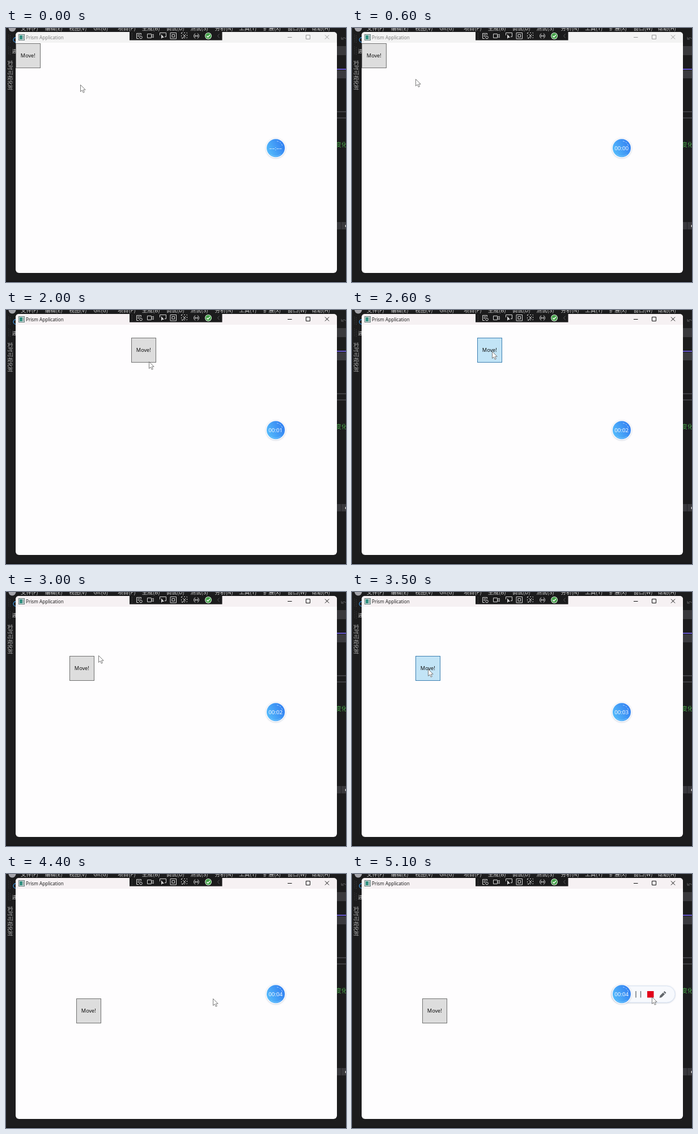
An HTML page for the animation above (5300 ms loop, 600 by 449 pixels).

```html
<!DOCTYPE html>
<html lang="en">
<head>
<meta charset="utf-8">
<title>Move button</title>
<style>
  html, body { margin: 0; width: 100%; height: 100%; overflow: hidden; background: #1c1c1d; }
  svg { display: block; width: 600px; height: 449px; }
  text { font-family: "Open Sans", "Noto Sans", sans-serif; white-space: pre; }
  .cjk { font-family: "Noto Sans CJK SC", "Noto Sans CJK", "Open Sans", sans-serif; }
  .line { fill: none; stroke: #d6d6d6; }
  #title { fill: #777; }
  #chrome { fill: none; stroke: #999; }
  #bar { fill: #f3f3f3; }
  .active #title { fill: #111; }
  .active #chrome { stroke: #111; }
  .active #bar { fill: #f6f1f3; }
  #box rect { fill: #ddd; stroke: #707070; }
  #box.hover rect { fill: #c2e4f6; stroke: #3c7fb1; }
  #box.down rect { fill: #bfe3f6; stroke: #2c628b; }
</style>
</head>
<body>
<svg viewBox="0 0 600 449">
  <defs>
    <linearGradient id="blue" x1="1" y1="0.2" x2="0" y2="0.7">
      <stop offset="0" stop-color="#307cf1"/>
      <stop offset="1" stop-color="#55bcfb"/>
    </linearGradient>
    <filter id="soft" x="-30%" y="-30%" width="160%" height="160%">
      <feDropShadow dx="0" dy="0.5" stdDeviation="1.2" flood-color="#7a8ca8" flood-opacity="0.5"/>
    </filter>
    <clipPath id="client"><rect x="17" y="26" width="567" height="407"/></clipPath>
  </defs>

  <!-- editor behind the window -->
  <rect width="600" height="449" fill="#1c1c1d"/>
  <rect y="447.5" width="600" height="1.5" fill="#111112"/>
  <circle cx="11" cy="0" r="6.5" fill="#a4a4aa"/>
  <g id="menu" font-size="9.5" fill="#d0d0d0"></g>
  <path d="M4.5 12V27M7.5 13V27M4.5 33V47M7.5 34V47" stroke="#46464a" stroke-dasharray="1 2"/>
  <circle cx="17" cy="21" r="4" fill="none" stroke="#3c8fd6" stroke-width="1.3"/>
  <text class="cjk" x="10.5" y="43.5" font-size="8" fill="#d0d0d0">进</text>
  <text class="cjk" transform="translate(3.5 57) rotate(90)" font-size="8.8" fill="#b4b4b4">实时可视化树</text>
  <path d="M592 20q4-5 8-1M592 16v4h4" fill="none" stroke="#5a5a5d"/>
  <rect x="583" y="32" width="17" height="16" fill="#39393c"/>
  <rect x="583" y="72" width="17" height="1.7" fill="#7160e8"/>
  <rect x="583" y="75" width="17" height="14" fill="#3a3a3e"/>
  <path d="M583 148H600M583 159H600" stroke="#4a4a4e" stroke-width="1.6"/>
  <text class="cjk" x="582" y="210" font-size="10" fill="#48a548">变化</text>
  <rect x="583" y="343" width="17" height="13" fill="#38383b"/>
  <path d="M591.5 343V356" stroke="#232325"/>
  <circle cx="601" cy="350" r="2.5" fill="#ddd"/>

  <!-- application window -->
  <g id="window">
    <rect x="17" y="7" width="567" height="426" rx="6" fill="#fefdfe"/>
    <path id="bar" d="M17 26V13q0-6 6-6H578q6 0 6 6V26Z"/>
    <g transform="translate(22 11)">
      <rect x=".5" y=".5" width="10" height="10" fill="#dfe9e8" stroke="#5d7775"/>
      <rect x="2" y="2" width="5" height="7" fill="#2f8f7f"/>
      <path d="M8.500 2V9" stroke="#5d7775"/>
    </g>
    <text id="title" x="35" y="20" font-size="8.200">Prism Application</text>
    <path id="chrome" d="M497 16.500h7.500M529.500 12.500h7v7h-7zM563 12.500l7 7M570 12.500l-7 7"/>
  </g>

  <!-- debug toolbar -->
  <rect x="218" y="7" width="163.500" height="14.600" fill="#1b1b1c"/>
  <path d="M222.500 9V20" stroke="#555" stroke-dasharray="1 2"/>
  <g class="line">
    <path d="M238.500 12V9.500H230.500V18.500H234M232 12h5M232 14.500h3"/>
    <circle cx="238" cy="16.500" r="2.300"/>
    <path d="M249.500 10.500h7v7h-7zM257 13l3-2v6l-3-2"/>
    <path d="M271.500 13V8.500H282.500V15.500H280"/>
    <path d="M274 11v8l2-2h3z" fill="#d6d6d6" stroke="none"/>
    <path d="M290 8.500h10.500v10.500H290zM293 11.500h4.500v4.500H293z"/>
    <path d="M309.500 8.500h10v9h-10z" stroke-dasharray="2 2.500"/>
    <path d="M311 19l6-8M312 11l5 5"/>
    <path d="M334 9.500q-5 4.500 0 9M338 9.500q5 4.500 0 9M334 12v4M338 12v4M334 14h4"/>
  </g>
  <circle cx="357" cy="14" r="6" fill="#dceedd"/>
  <circle cx="357" cy="14" r="5" fill="#43a047"/>
  <path d="M354.300 14l2 2.200 3.600-4.200" fill="none" stroke="#fff" stroke-width="1.400"/>
  <path d="M376.500 10.500l-3 3.500 3 3.500" fill="none" stroke="#5a5a5d"/>

  <g clip-path="url(#client)">
    <g id="box">
      <rect x=".5" y=".5" width="43" height="43"/>
      <text x="21.800" y="24.800" font-size="9.200" font-weight="500" text-anchor="middle">Move!</text>
    </g>
  </g>

  <!-- recorder -->
  <rect id="panel" x="458" y="198" height="29" rx="14.500" fill="#f7f9fd" stroke="#dbe5f4" filter="url(#soft)"/>
  <g id="tools">
    <path d="M501 207V218.500M509.500 207V218.500" stroke="#737980" stroke-width="1.500"/>
    <rect x="521" y="207" width="11.500" height="11.500" fill="#e2001a"/>
    <path d="M542.500 219l1-4 5.500-5.500 3 3-5.500 5.500zM549.800 208.700l1.700-1.700 3 3-1.700 1.700z" fill="#62676c"/>
  </g>
  <circle cx="476" cy="212.300" r="17.500" fill="#f6f9fe" filter="url(#soft)"/>
  <circle cx="476" cy="212.300" r="16" fill="url(#blue)"/>
  <path d="M478 200q7 1 9.500 8" fill="none" stroke="#cfe6ff" stroke-dasharray="3 2" opacity=".75"/>
  <path d="M467 223.500q9 6 18 0" fill="none" stroke="#8fd6ff" opacity=".6"/>
  <text id="clock" x="475.700" y="215.900" font-size="9.800" fill="#fff" text-anchor="middle"></text>

  <path id="cursor" d="M.5 .5V12.500L3.300 9.900L5.300 14.300L7.300 13.400L5.400 9.200H9.200Z" fill="#fff" stroke="#5a5a5a" stroke-width=".8"/>
</svg>
<script>
const $ = id => document.getElementById(id);
const LOOP = 5300, STEP = 100;
const clamp = u => Math.min(1, Math.max(0, u));

// A stroke runs straight to its end point; bend bows it, wave swings it from side to side.
const move = (start, end, to, bend = [0, 0], wave = 0) => ({ start, end, to, bend, wave });

const boxPath = { from: [17, 27], moves: [
  move(1200, 2000, [221, 49], [0, 130], 115),
  move(2600, 3000, [112, 113], [-115, 0]),
  move(3600, 4200, [124, 220], [-50, -48])
] };
const cursorPath = { from: [131, 100], moves: [
  move(500, 1000, [35, 51]),
  move(1200, 2000, [252, 91], [0, 130], 115),
  move(2000, 2300, [247, 73]),
  move(2600, 3000, [163, 112], [-115, 0]),
  move(3000, 3400, [134, 136]),
  move(3600, 4200, [147, 228], [-2, -47]),
  move(4200, 4600, [583, 212]),
  move(4600, 5100, [529, 217])
] };

function along({ from, moves }, t) {
  let pos = from;
  for (const m of moves) {
    if (t <= m.start) break;
    const u = clamp((t - m.start) / (m.end - m.start));
    const bow = Math.sin(Math.PI * u);
    pos = pos.map((p, i) => p + (m.to[i] - p) * u + m.bend[i] * bow);
    pos[0] += m.wave * Math.sin(2 * Math.PI * u);
  }
  return pos.map(Math.round);
}

const place = (id, [x, y]) => $(id).setAttribute("transform", `translate(${x} ${y})`);
const show = (id, on) => { $(id).style.display = on ? "" : "none"; };

function draw(t) {
  const box = along(boxPath, t), cursor = along(cursorPath, t);
  place("box", box);
  place("cursor", cursor);

  // The box lights up under a free pointer, not while it is dragged.
  const dragged = boxPath.moves.some(m => t > m.start && t <= m.end);
  const over = cursor.every((c, i) => c >= box[i] && c < box[i] + 44);
  const free = t < boxPath.moves[2].end;
  $("box").setAttribute("class", t === 1200 ? "down" : over && free && !dragged ? "hover" : "");
  $("window").setAttribute("class", t >= 1100 ? "active" : "");

  const sec = Math.floor((t - 300) / 1000);
  $("clock").textContent = sec < 0 ? "––:––" : "00:0" + sec;

  const open = clamp((t - 4400) / 300);
  $("panel").setAttribute("width", 35 + 77 * open);
  show("panel", open > 0);
  show("tools", open === 1);
}

const labels = "文件(F) 编辑(E) 视图(V) Git(G) 项目(P) 生成(B) 调试(D) 测试(S) 分析(N) 工具(T) 扩展(X) 窗口(W) 帮助(H)";
$("menu").innerHTML = labels.split(" ").map((label, i) =>
  `<text class="cjk" x="${26 + i * 42.8}" y="3.5">${label}</text>`).join("");

const start = performance.now();
function tick() {
  const t = (performance.now() - start) % LOOP;
  draw(Math.floor(t / STEP) * STEP);
  requestAnimationFrame(tick);
}
tick();
</script>
</body>
</html>
```
